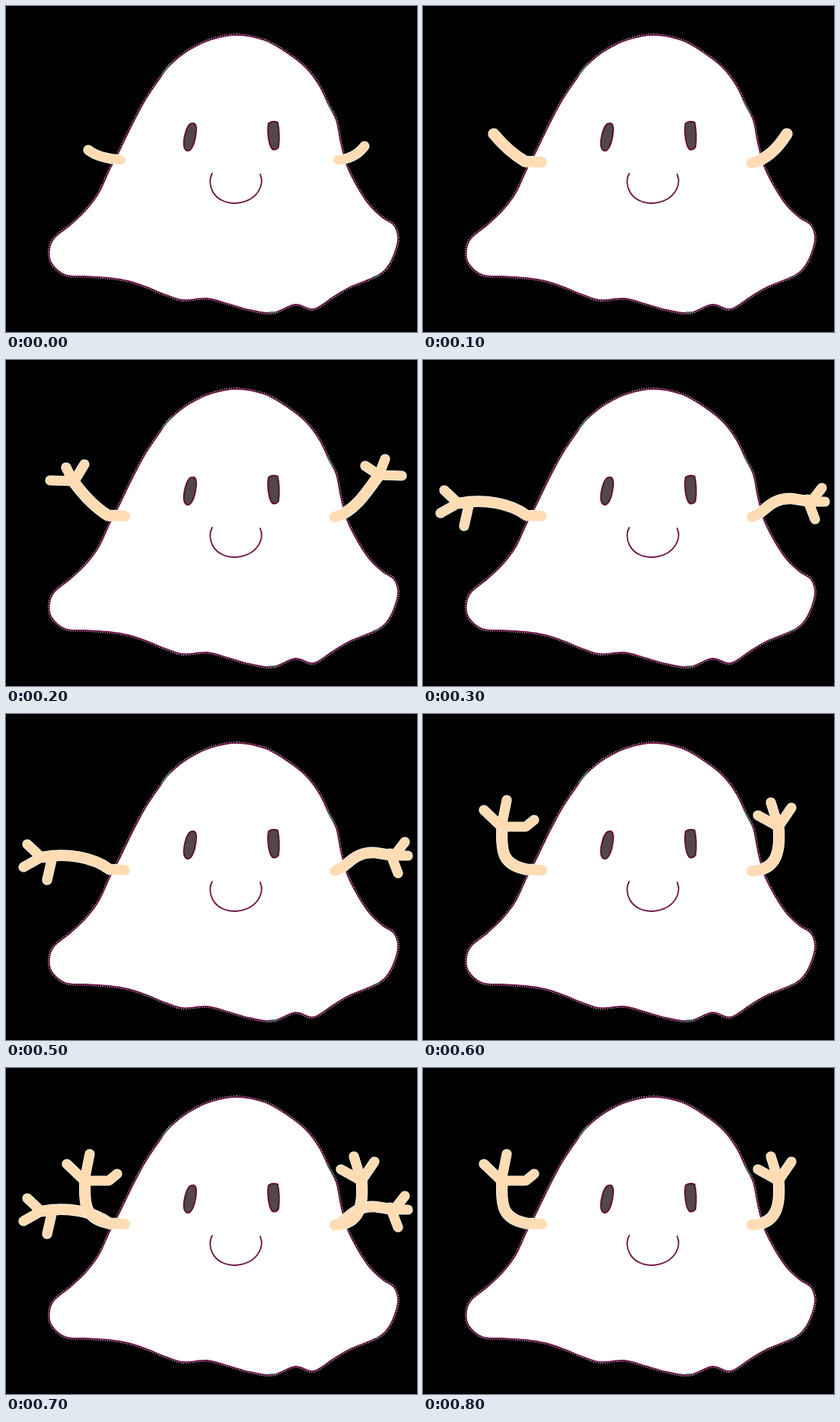
Recreate the animation shown at these times as an HTML page. Size 540 px wide and 428 px high, loop 900 ms.

```html
<!DOCTYPE html>
<html lang="en">
<head>
<meta charset="utf-8">
<title>Waving ghost</title>
<style>
  html, body { margin: 0; width: 100%; height: 100%; overflow: hidden; background: #000; }
  svg { display: block; width: 540px; height: 428px; }
  path { fill: none; stroke-linecap: round; stroke-linejoin: round; }
  .body { fill: #fff; stroke: #fff; stroke-width: 3.6; stroke-dasharray: 1 2; stroke-linecap: butt; }
  .ink { stroke: #701448; stroke-width: 1.8; }
  .tint { stroke: #3f7d70; stroke-width: 1.3; }
  .eye { fill: #514848; stroke: #60103c; stroke-width: 2; }
  .rim path { stroke: #fff; }
  .skin path { stroke: #ffdcb4; }
</style>
</head>
<body>
<svg viewBox="0 0 540 428">
  <path class="body" id="fringe"/>
  <path class="ink" id="outline"/>
  <path class="tint" d="M205 90L217 75M422 127L430 142M346 402L355 402M482 356L490 353"/>
  <path class="eye" d="M245 154C250 153 251 160 249 171C247 183 243 191 238 190C233 188 233 179 235 170C237 161 240 154 245 154Z"/>
  <path class="eye" d="M345 154Q351 150 357 153Q360 168 358 185Q355 190 350 188C345 183 343 164 345 154Z"/>
  <path class="ink" d="M271 220C264 231 269 258 301 259C329 257 340 237 334 221L336 228"/>
  <g id="arms"></g>
</svg>
<script>
const SVG = 'http://www.w3.org/2000/svg';
const FRAME = 100;

const bodyPoints = [
  [303, 38], [270, 44], [240, 58], [214, 79], [200, 98], [182, 125], [165, 157],
  [150, 188], [136, 215], [122, 245], [105, 268], [85, 287], [64, 304], [57, 320],
  [60, 338], [78, 353], [105, 355], [135, 357], [160, 361], [185, 369], [207, 378],
  [232, 386], [264, 384], [292, 391], [320, 399], [350, 403], [380, 392], [404, 398],
  [430, 382], [452, 369], [488, 354], [503, 340], [512, 320], [515, 303], [509, 287],
  [495, 278], [478, 262], [462, 238], [448, 210], [440, 180], [434, 150], [424, 130],
  [412, 105], [395, 82], [370, 62], [340, 45]
];

// Each pose lists [path, width] strokes.
const poses = {
  stub: [
    ['M108 189Q122 200 151 202M436 202Q458 201 471 184', 12]
  ],
  reach: [
    ['M156 205L134 204Q112 191 93 168M432 206Q458 200 478 168', 14]
  ],
  raised: [
    ['M156 205L134 204Q111 190 89 160M432 206C455 201 471 178 490 151', 14],
    ['M58 158L88 159L79 141M103 137L89 160', 12],
    ['M472 139L490 151L498 130M520 152L490 151', 12]
  ],
  wide: [
    ['M156 205L136 204C115 188 80 182 48 188M432 206C450 201 454 181 485 182L510 186', 13.5],
    ['M28 171L46 188L23 201M61 187L54 218', 12],
    ['M524 168L510 186L528 186M505 183L515 209', 12]
  ],
  up: [
    ['M156 205L136 204C105 198 102 182 104 147M432 206C465 205 470 180 467 147', 14],
    ['M80 126L103 148L110 113M103 148L135 148L146 139', 12],
    ['M440 133L467 148L457 116M484 123L467 148', 12]
  ]
};

const timeline = [
  ['stub'], ['reach'], ['raised'], ['wide'], ['up'], ['wide'], ['up'], ['up', 'wide'], ['up']
];

function add(parent, name, attrs = {}) {
  const node = document.createElementNS(SVG, name);
  for (const key in attrs) node.setAttribute(key, attrs[key]);
  return parent.appendChild(node);
}

// Closed Catmull-Rom curve written as cubic segments.
function smoothLoop(points) {
  const at = i => points[(i + points.length) % points.length];
  let d = 'M' + points[0];
  points.forEach((p, i) => {
    const [before, next, after] = [at(i - 1), at(i + 1), at(i + 2)];
    const c1 = p.map((v, k) => v + (next[k] - before[k]) / 6);
    const c2 = next.map((v, k) => v - (after[k] - p[k]) / 6);
    d += `C${c1} ${c2} ${next}`;
  });
  return d + 'Z';
}

function drawPose(name) {
  const group = add(document.getElementById('arms'), 'g');
  for (const [layer, extra] of [['rim', 1.2], ['skin', 0]]) {
    const g = add(group, 'g', { class: layer });
    for (const [d, width] of poses[name]) add(g, 'path', { d, 'stroke-width': width + extra });
  }
  const count = timeline.length;
  const keyframes = timeline.map((shown, i) => ({
    opacity: shown.includes(name) ? 1 : 0,
    offset: i / count,
    easing: 'step-end'
  }));
  keyframes.push({ opacity: keyframes[count - 1].opacity, offset: 1 });
  group.animate(keyframes, { duration: count * FRAME, iterations: Infinity }).startTime = 0;
}

const bodyPath = smoothLoop(bodyPoints);
for (const id of ['fringe', 'outline']) document.getElementById(id).setAttribute('d', bodyPath);
Object.keys(poses).forEach(drawPose);
</script>
</body>
</html>
```
